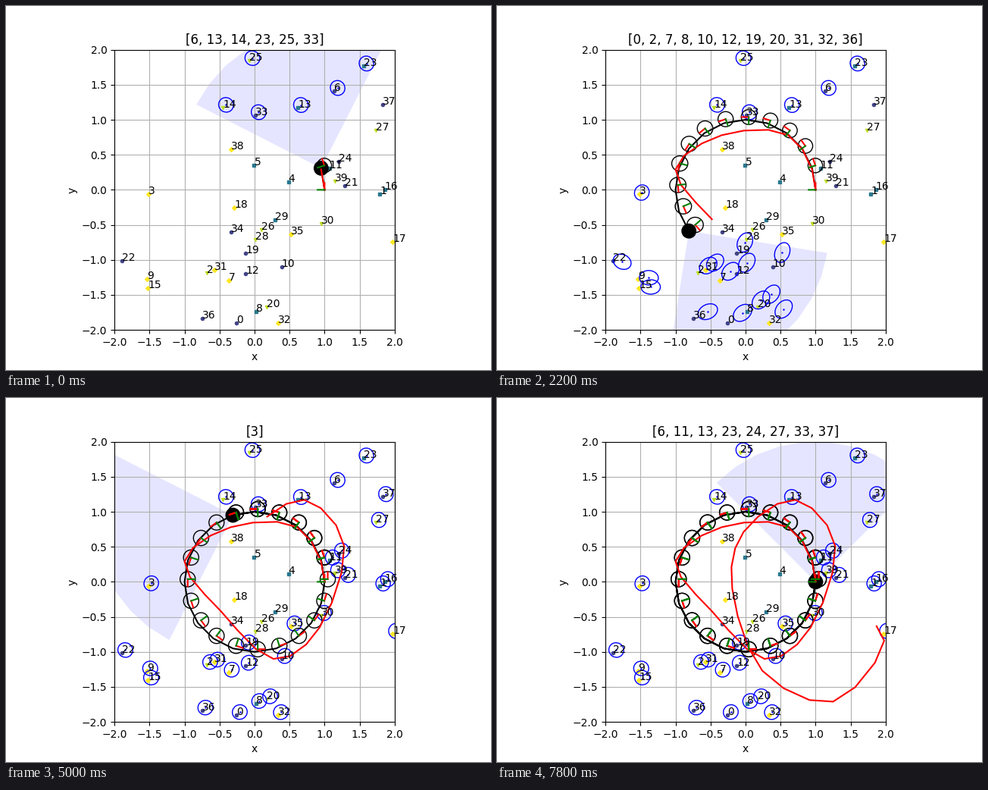
A matplotlib script that plays this animation: 640 px wide and 480 px high, repeating every 8000 ms.

```python
import numpy as np
import matplotlib.pyplot as plt
from matplotlib.animation import FuncAnimation
from matplotlib.patches import Circle, Ellipse, Polygon

FRAMES, INTERVAL = 40, 200
STEP = np.pi / 10                   # robot turns 18 degrees per step
REACH, HALF_FOV = 2.0, np.pi / 4
AXIS = 0.1                          # length of the pose axes

STYLES = [("D", "#fde725"), ("v", "#bddf26"), ("o", "#414487"), ("s", "#2a788e")]

SHIFT = np.array([0.045, 0.038])    # constant error of every estimate
PIVOT = np.array([-1.33, -0.125])   # the map swings around this point
MAX_SWING = 0.095


def direction(angle):
    return np.stack([np.cos(angle), np.sin(angle)], -1)


rng = np.random.RandomState(2)
marks, kinds = [], []
for _ in range(40):
    marks.append(rng.uniform(-2, 2, 2))
    kinds.append(rng.randint(4))
marks = np.array(marks)

turns = STEP * np.arange(FRAMES + 1)
headings = turns + np.pi / 2
truth = direction(turns)


def smooth_path(knots, every, count):
    """Cubic curve through knots; the first and last only set the slope."""
    p = np.array(knots)
    m = np.gradient(p, axis=0)
    i, t = np.divmod(np.arange(count) / every, 1)
    i, t = i.astype(int) + 1, t[:, None]
    return ((1 + 2 * t) * (1 - t) ** 2 * p[i] + t * (1 - t) ** 2 * m[i]
            + t * t * (3 - 2 * t) * p[i + 1] + t * t * (t - 1) * m[i + 1])


# Path from odometry alone, one knot every three steps
odometry = smooth_path([
    (0.59, -0.81), (1, 0), (0.61, 0.78), (-0.34, 0.78), (-1, 0.29),
    (-0.48, -0.42), (0.27, -1.1), (0.93, -0.65), (1.28, 0.51), (0.71, 1.17),
    (-0.03, 0.71), (-0.19, -0.1), (0.24, -1.27), (1.25, -1.71),
    (1.98, -0.84), (1.35, -0.29)], 3, FRAMES + 1)


def visible(k):
    d = marks - truth[k + 1]
    bearing = np.arctan2(d[:, 1], d[:, 0]) - headings[k + 1]
    bearing = (bearing + np.pi) % (2 * np.pi) - np.pi
    return (np.hypot(*d.T) < REACH) & (np.abs(bearing) < HALF_FOV)


seen = np.array([visible(k) for k in range(FRAMES)])
known = np.logical_or.accumulate(seen)


def map_swing(k):
    """Heading drift of the map; it vanishes once the lap closes."""
    return np.interp(k, [12, 17, 20], [MAX_SWING, 0.025, 0])


def estimate(p, swing):
    dx, dy = p - PIVOT
    return p + SHIFT + swing * np.array([-dy, dx])


fig, ax = plt.subplots(figsize=(6.4, 4.8), dpi=100)
ax.set_aspect("equal")
ax.set(xlim=(-2, 2), ylim=(-2, 2), xlabel="x", ylabel="y")
ax.set_xticks(np.arange(-2, 2.1, 0.5))
ax.set_yticks(np.arange(-2, 2.1, 0.5))
ax.grid(True)
title = ax.set_title("")
for i, (x, y) in enumerate(marks):
    shape, color = STYLES[kinds[i]]
    ax.plot(x, y, shape, color=color, ms=3, zorder=1.6)
    ax.text(x, y, str(i))

sector = ax.add_patch(Polygon([(0, 0), (1, 0), (0, 1)], fc="blue", alpha=0.1, lw=0))
robot = ax.add_patch(Circle((1, 0), 0.1, color="black", zorder=1.8))
true_line, = ax.plot([], [], "k-")
odo_line, = ax.plot([], [], "r-")
x_axes, = ax.plot([], [], "r-", zorder=2.4)
y_axes, = ax.plot([], [], "g-", zorder=2.4)
centers, = ax.plot([], [], "b.", ms=1.5)


def ring(color, z):
    return ax.add_patch(Ellipse((0, 0), 0.2, 0.2, fill=False, ec=color, zorder=z))


mark_rings = [ring("blue", 1.7) for _ in marks]
pose_rings = [ring("black", 1.9) for _ in range(FRAMES)]


def place(e, center, a, b, angle=0):
    e.set(center=center, width=2 * a, height=2 * b, angle=angle)


def draw_marks(k):
    dots = []
    for i, e in enumerate(mark_rings):
        e.set_visible(bool(known[k, i]))
        if not known[k, i]:
            continue
        swing = 0 if seen[0, i] else map_swing(k)
        c = estimate(marks[i], swing)
        # stretched across the line of sight, more so far from the pivot
        dx, dy = c - PIVOT
        stretch = 0.04 * swing / MAX_SWING * min(1, np.hypot(dx, dy) / 1.6)
        place(e, c, 0.107 + stretch, 0.103, np.degrees(np.arctan2(dx, -dy)))
        dots.append(c)
    centers.set_data(*np.array(dots).T)


def draw_poses(k):
    xs, ys = [], []

    def add_axes(c, heading):
        for out, a in ((xs, heading), (ys, heading + np.pi / 2)):
            out.extend([c, c + AXIS * direction(a), (np.nan, np.nan)])

    add_axes(truth[0], headings[0])
    for i, e in enumerate(pose_rings, 1):
        e.set_visible(i <= k + 1)
        if i > k + 1:
            continue
        swing = map_swing(k) * np.clip((i - 5) / 5, 0, 1)
        c = estimate(truth[i], swing)
        r = 0.103 + 0.006 * min(1, i / 8)
        place(e, c, r + 0.08 * swing, r)
        add_axes(c, headings[i] + swing)
    x_axes.set_data(*np.array(xs).T)
    y_axes.set_data(*np.array(ys).T)


def update(k):
    here = truth[k + 1]
    arc = headings[k + 1] + np.linspace(-HALF_FOV, HALF_FOV, 10)
    sector.set_xy(np.vstack([here, here + REACH * direction(arc)]))
    robot.set_center(here)
    true_line.set_data(*truth[:k + 2].T)
    odo_line.set_data(*odometry[:k + 2].T)
    draw_marks(k)
    draw_poses(k)
    title.set_text(str(np.flatnonzero(seen[k]).tolist()))
    return []


anim = FuncAnimation(fig, update, frames=FRAMES, interval=INTERVAL,
                     init_func=lambda: update(0), repeat=True, repeat_delay=0)
plt.show()
```
